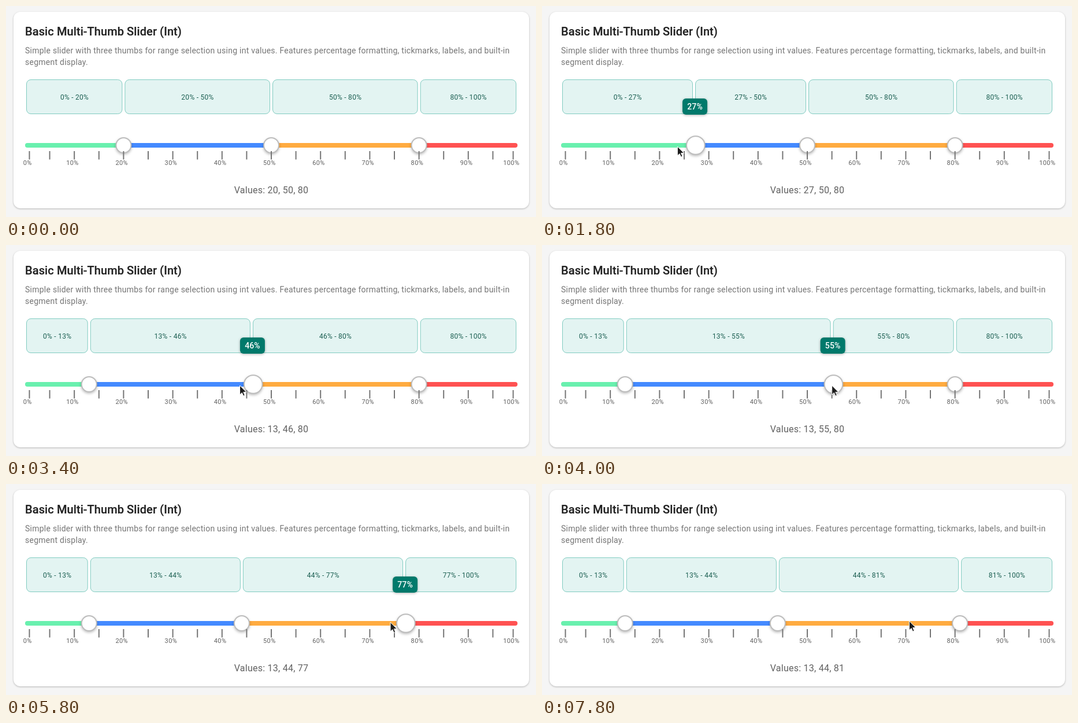
Recreate the animation shown at these times as an HTML page. Size 917 by 365 pixels, loop 8 s.

```html
<!DOCTYPE html>
<html lang="en">
<head>
<meta charset="utf-8">
<title>Multi-Thumb Slider</title>
<style>
html, body { margin: 0; width: 100%; height: 100%; overflow: hidden; background: #f5f5f5; }
svg { display: block; width: 917px; height: 365px; font-family: Roboto, "Liberation Sans", sans-serif; }
.card { fill: #fff; filter: drop-shadow(0 1px 1.5px rgba(0,0,0,.26)); }
.title { font-size: 20px; font-weight: 500; letter-spacing: .09px; fill: #212121; stroke: #212121; stroke-width: .2px; }
.about { font-size: 14px; letter-spacing: .25px; fill: #757575; }
.values { font-size: 16px; letter-spacing: .25px; fill: #616161; text-anchor: middle; }
.segment rect { fill: #e3f4f2; stroke: #80cbc0; }
.segment text { font-size: 12px; letter-spacing: .27px; fill: #1c5f52; text-anchor: middle; }
.scale text { font-size: 11px; letter-spacing: .4px; fill: #616161; text-anchor: middle; }
.scale line { stroke: #757575; stroke-width: 2; }
.thumb { fill: #fff; stroke: #bdbdbd; stroke-width: 2; filter: drop-shadow(0 2px 2px rgba(0,0,0,.26)); }
.tip rect { fill: #00796b; filter: drop-shadow(0 1px 2px rgba(0,0,0,.3)); }
.tip text { font-size: 14px; font-weight: 500; letter-spacing: .1px; fill: #fff; text-anchor: middle; }
.cursor { fill: #1c1c1c; stroke: #fff; stroke-width: 1; }
</style>
</head>
<body>
<svg id="stage" viewBox="0 0 917 365"></svg>
<script>
const LOOP = 8000, FRAME = 1000 / 15;
const LEFT = 33, WIDTH = 852, MID = 241;
const LINGER = 330; // how long a released thumb keeps its tooltip
const COLORS = ['#69f0ae', '#448aff', '#ffab40', '#ff5252'];

// The pointer drives everything: [start, end, percent along the track, y]
const ENTRY = { percent: 35, y: 341 };
const moves = [
  [67, 733, 20], [867, 1267, 27], [1733, 2133, 13],
  [2400, 2733, 47], [2933, 3133, 50], [3233, 3733, 36], [3733, 3933, 55],
  [4000, 4067, 57], [4333, 4467, 44],
  [4733, 5067, 81.3, 217], [5267, 5400, 80, 236], [5600, 5667, 81, 236], [5667, 6067, 66],
  [6333, 6400, 74, 231], [6467, 6733, 81], [6800, 6933, 85], [7533, 7800, 70.7, 237]
];
const thumbs = [
  { press: 867, release: 2133 },
  { press: 3133, release: 4467 },
  { press: 5600, release: 6800 }
];

const stage = document.getElementById('stage');
const xOf = percent => LEFT + WIDTH * percent / 100;
const clamp = (n, low, high) => Math.min(Math.max(n, low), high);
const mix = (a, b, p) => a + (b - a) * p;
const easeOut = p => 1 - (1 - p) ** 1.5;

function set(node, attrs) {
  for (const key in attrs) node.setAttribute(key, attrs[key]);
  return node;
}
function add(tag, attrs, parent = stage, text = '') {
  const node = set(document.createElementNS('http://www.w3.org/2000/svg', tag), attrs);
  node.textContent = text;
  return parent.appendChild(node);
}

function pointerAt(time) {
  return moves.reduce((from, [start, end, percent, y = 243]) => {
    const p = easeOut(clamp((time - start) / (end - start), 0, 1));
    return { percent: mix(from.percent, percent, p), y: mix(from.y, y, p) };
  }, ENTRY);
}

// A thumb trails the pointer by one frame while it is held
function valueAt({ press, release }, time) {
  return Math.round(pointerAt(clamp(time - FRAME, press, release)).percent);
}

add('rect', { class: 'card', x: 13, y: 10, width: 892, height: 340, rx: 12 });
add('text', { class: 'title', x: 33, y: 51 }, stage, 'Basic Multi-Thumb Slider (Int)');
add('text', { class: 'about', x: 33, y: 82 }, stage,
  'Simple slider with three thumbs for range selection using int values. ' +
  'Features percentage formatting, tickmarks, labels, and built-in');
add('text', { class: 'about', x: 33, y: 102 }, stage, 'segment display.');

const segments = COLORS.map(() => {
  const group = add('g', { class: 'segment' });
  return {
    box: add('rect', { y: 127.5, height: 59, rx: 7.5 }, group),
    label: add('text', { y: 162 }, group)
  };
});

const clip = add('clipPath', { id: 'track' });
add('rect', { x: LEFT, y: MID - 4, width: WIDTH, height: 8, rx: 4 }, clip);
const track = add('g', { 'clip-path': 'url(#track)' });
const bars = COLORS.map(fill => add('rect', { y: MID - 4, height: 8, fill }, track));
const valuesText = add('text', { class: 'values', x: 459, y: 324 });
const knobs = thumbs.map(() => add('circle', { class: 'thumb', cy: MID }));

const scale = add('g', { class: 'scale' });
for (let value = 0; value <= 100; value += 5) {
  const x = clamp(xOf(value), LEFT + 7.5, LEFT + WIDTH - 7.5);
  add('line', { x1: x, x2: x, y1: 251, y2: 265.5 }, scale);
  if (value % 10 === 0) add('text', { x: x - 3.2, y: 275 }, scale, value + '%');
}

const tip = add('g', { class: 'tip' });
add('rect', { x: -21.5, y: 160, width: 43, height: 28, rx: 6 }, tip);
const tipText = add('text', { x: 0, y: 179 }, tip);
const cursor = add('path', { class: 'cursor',
  d: 'M0 0V16L3.7 12.6L6.2 18.2L8.7 17.1L6.3 11.5H11.4Z' });

function draw(time) {
  const values = thumbs.map(thumb => valueAt(thumb, time));
  const stops = [0, ...values, 100];

  segments.forEach(({ box, label }, i) => {
    const x1 = xOf(stops[i]), x2 = xOf(stops[i + 1]);
    set(box, { x: x1 + 2.5, width: x2 - x1 - 5 });
    set(label, { x: (x1 + x2) / 2 + .3 });
    label.textContent = `${stops[i]}% - ${stops[i + 1]}%`;
    set(bars[i], { x: x1, width: x2 - x1 });
  });
  valuesText.textContent = 'Values: ' + values.join(', ');

  const held = thumbs.findIndex(({ press, release }) =>
    time >= press + FRAME - 1 && time < release + LINGER);
  knobs.forEach((knob, i) => {
    const grown = i === held ? 2.8 : 0;
    set(knob, { cx: xOf(values[i]) + grown, r: 13 + grown });
  });
  set(tip, { visibility: held < 0 ? 'hidden' : 'visible' });
  if (held >= 0) {
    set(tip, { transform: `translate(${xOf(values[held]) + 1.5} 0)` });
    tipText.textContent = values[held] + '%';
  }

  const pointer = pointerAt(time);
  set(cursor, {
    visibility: time < FRAME ? 'hidden' : 'visible',
    transform: `translate(${xOf(pointer.percent)} ${pointer.y})`
  });
}

const start = performance.now();
function tick() {
  const elapsed = (performance.now() - start) % LOOP;
  draw(Math.floor(elapsed / FRAME + .1) * FRAME % LOOP);
  requestAnimationFrame(tick);
}
tick();
</script>
</body>
</html>
```
